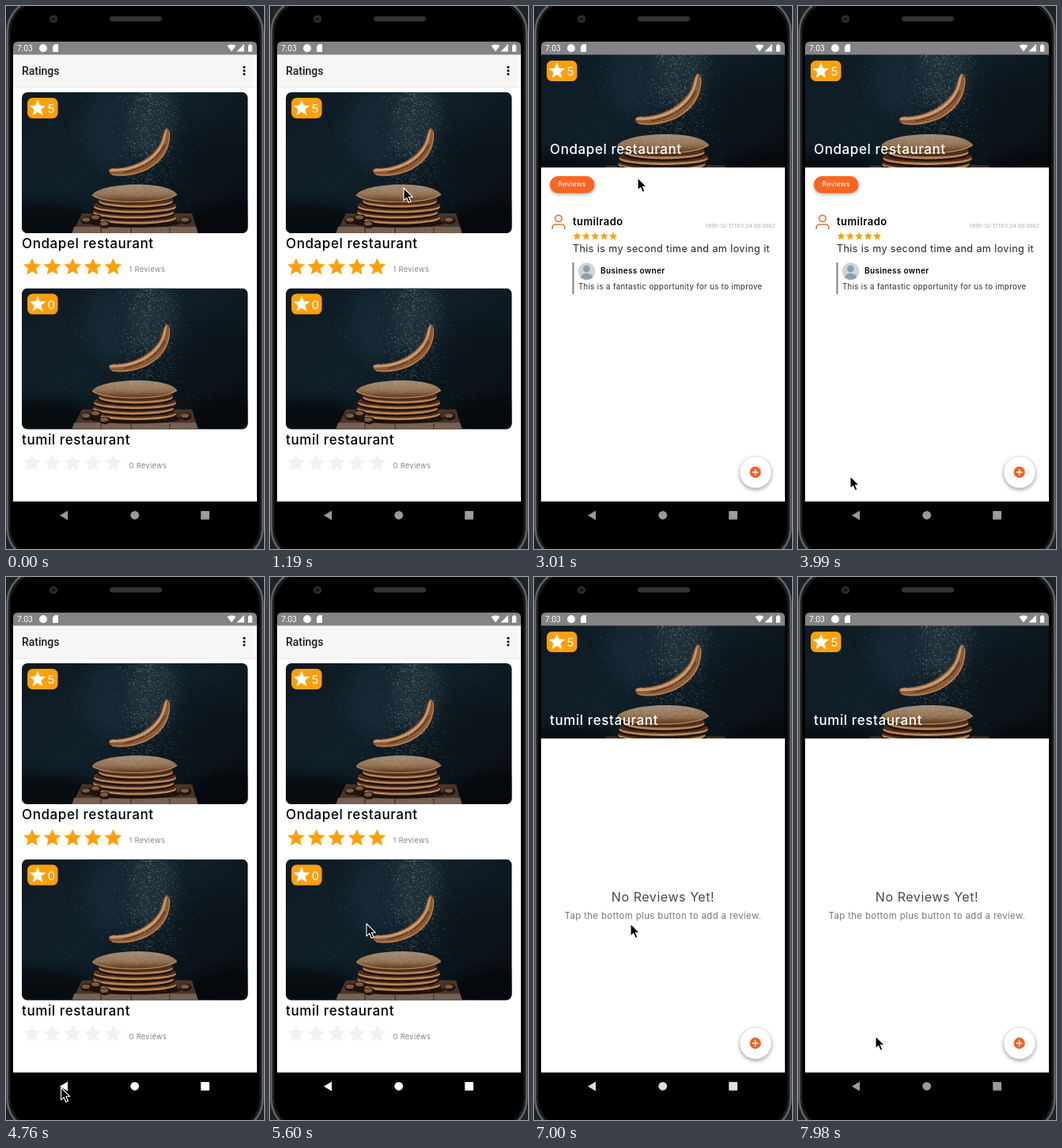
Animation, 326 px wide and 686 px high, one loop 8000 ms. Source, as an HTML page:

```html
<!DOCTYPE html>
<html lang="en">
<head>
<meta charset="utf-8">
<title>Ratings app</title>
<style>
html, body { margin: 0; width: 100%; height: 100%; overflow: hidden; background: #000; }
svg { display: block; }
text { font-family: Inter, "Open Sans", sans-serif; letter-spacing: .035em; white-space: pre; }
.ui { font-family: Roboto, sans-serif; letter-spacing: 0; }
.pill { filter: drop-shadow(0 2px 2px rgba(0,0,0,.28)); }
.fab { filter: drop-shadow(0 2.5px 2.5px rgba(0,0,0,.38)); }
.soft { filter: blur(9px); }
</style>
</head>
<body>
<svg id="stage" width="326" height="686" viewBox="0 0 326 686" xmlns="http://www.w3.org/2000/svg"></svg>
<script>
const ORANGE = '#ffa008', CORAL = '#fb6521';
const LOOP = 8000, TICK = 70;

let seed = 11;
const rnd = () => (seed = (seed * 16807) % 2147483647) / 2147483647;

const text = (x, y, size, str, fill = '#000', extra = '') =>
  `<text x="${x}" y="${y}" font-size="${size}" fill="${fill}" ${extra}>${str}</text>`;

function star(cx, cy, r, fill, ratio = 0.47) {
  let d = '';
  for (let i = 0; i < 10; i++) {
    const a = (i / 5 - 0.5) * Math.PI, q = i % 2 ? r * ratio : r;
    d += (i ? 'L' : 'M') + (cx + q * Math.cos(a)).toFixed(2) + ' ' + (cy + q * Math.sin(a)).toFixed(2);
  }
  return `<path d="${d}Z" fill="${fill}" stroke="${fill}" stroke-width="${r * 0.06}" stroke-linejoin="round"/>`;
}

const stars = (x, y, step, r, fill) =>
  [0, 1, 2, 3, 4].map(i => star(x + i * step, y, r, fill)).join('');

const ellipse = (x, y, rx, ry, fill, extra = '') =>
  `<ellipse cx="${x}" cy="${y}" rx="${rx}" ry="${ry}" fill="${fill}" ${extra}/>`;

// Specks of sugar, densest around (cx, cy)
function dust(count, cx, cy, w, h, color, opacity) {
  let d = '';
  for (let i = 0; i < count; i++) {
    const x = cx + (rnd() + rnd() - 1) * w, y = cy + (rnd() * 2 - 1) * h;
    d += `M${x.toFixed(1)} ${y.toFixed(1)}h.8`;
  }
  return `<path d="${d}" stroke="${color}" stroke-width=".8" opacity="${opacity}"/>`;
}

function photo() {
  const layers = [[159, 51, 144], [152, 51, 141], [145, 52, 143], [138, 47, 144]].map(([y, rx, x]) =>
    ellipse(x, y + 2, rx + 1, 8, '#1c100a') + ellipse(x, y, rx, 7.6, '#b58455') +
    ellipse(x, y - 2.2, rx, 7, '#4f2d18')).join('');
  const nuts = [[82, 162], [105, 167], [207, 162], [94, 159]].map(([x, y]) =>
    ellipse(x, y, 7.5, 4.8, '#20140d') + ellipse(x - 1, y - 1.2, 5, 2.6, '#7d593d')).join('');
  return `<g id="photo">
    <rect width="286" height="179" fill="url(#night)"/>
    <g class="soft">
      ${ellipse(115, 45, 40, 50, '#1a303c', 'opacity=".5"')}
      ${ellipse(165, 30, 28, 55, '#2a3c45', 'opacity=".55"')}
      ${ellipse(240, 95, 34, 42, '#0c151b', 'opacity=".7"')}
      ${ellipse(20, 165, 75, 26, '#05080b', 'opacity=".8"')}
      ${ellipse(262, 165, 50, 26, '#05070a', 'opacity=".8"')}
    </g>
    ${dust(520, 160, 55, 42, 60, '#b4c1c6', 0.5)}
    ${dust(330, 145, 88, 120, 85, '#9fb0b8', 0.4)}
    <path d="M76 153H215L223 179H63Z" fill="#45352b"/>
    <path d="M66 170H220L223 179H63Z" fill="#756052"/>
    <path d="M100 171V179M138 171V179M187 171V179" stroke="#30241d"/>
    ${ellipse(143, 165, 58, 6, '#1b110b')}
    ${layers}${nuts}
    <path d="M89 130C91 123 116 116.5 145 116.5S192 122 196 129C189 136 168 138 142 138.5S95 137 89 130Z" fill="url(#cake)"/>
    <path d="M89 130C100 137 121 138.5 142 138.5S186 136 196 129" fill="none" stroke="#b88a5f" stroke-width="1.2"/>
    ${dust(170, 143, 126, 50, 7, '#d8cbbb', 0.45)}
    <path d="M183 45C189 47 188 60 184 72C177 88 160 101 137 105C126 107 113 106 111 102C108 97 113 95 120 96C145 94 164 82 174 66C178 58 178 49 183 45Z" fill="#8c5a34"/>
    <path d="M183 46C179 51 180 58 175 67C165 84 145 95.5 120 97C115 96 110 97 111 100C130 101 154 95 167 82C179 70 183 57 183 46Z" fill="#c69c72"/>
    <path d="M186.5 50C188 70 176 87 160 96C146 103.500 127 106 114 104" fill="none" stroke="#c08a55" stroke-width="1.1"/>
    <path d="M181 66C172 85 152 96 129 101.500" fill="none" stroke="#6a4023" stroke-width="2"/>
    ${dust(170, 158, 60, 40, 60, '#e3e6e4', 0.6)}
    ${dust(110, 145, 160, 75, 17, '#cfc6bc', 0.4)}
  </g>`;
}

const badge = (x, y, digit, w = 38.5) =>
  `<rect x="${x}" y="${y}" width="${w}" height="26" rx="6.5" fill="${ORANGE}"/>` +
  star(x + 13, y + 13.3, 10.2, '#fff', 0.42) +
  text(x + 25.5, y + 19, 15, digit, '#fff');

const card = (y, name, digit, fill) => `
  <g transform="translate(20 ${y})">
    <g clip-path="url(#cardClip)"><use href="#photo"/></g>
    ${badge(7, 7, digit)}
    ${text(0, 197, 17, name, '#000', 'font-weight="500"')}
    ${stars(13, 221, 25.6, 10.8, fill)}
    ${text(135.5, 227, 9.3, digit === 5 ? '1 Reviews' : '0 Reviews', '#858585')}
  </g>`;

const list = `
  <g id="list">
    <rect x="9" y="61" width="308" height="41" fill="#f6f6f6"/>
    <rect x="9" y="102" width="308" height="1.5" fill="#eeeeee"/>
    ${text(20, 87, 14, 'Ratings', '#1c1c1c', 'class="ui" font-weight="500"')}
    ${[77.3, 81.7, 86.1].map(y => `<circle cx="301" cy="${y}" r="1.5"/>`).join('')}
    ${card(109, 'Ondapel restaurant', 5, ORANGE)}
    ${card(356.6, 'tumil restaurant', 0, '#f1f1f1')}
  </g>`;

const review = `
  <g id="review">
    <g fill="none" stroke="#dd7843" stroke-width="1.7" stroke-linecap="round">
      <circle cx="31" cy="268.5" r="4.1"/>
      <path d="M23.2 281.5V280A4 4 0 0 1 27.2 276H34.8A4 4 0 0 1 38.8 280V281.5"/>
    </g>
    ${text(49, 276.5, 13, 'tumilrado', '#000', 'font-weight="600"')}
    ${text(305.5, 280, 6.6, '1995-12-17T03:24:00.000Z', '#8c8c8c', 'text-anchor="end" font-weight="300"')}
    ${stars(54.5, 291, 11.4, 5, ORANGE)}
    ${text(49, 311, 12.5, 'This is my second time and am loving it', '#222')}
    <rect x="48.5" y="324" width="2" height="40" fill="#808080"/>
    <g clip-path="url(#avatarClip)">
      <rect x="55" y="324" width="23" height="23" fill="#ccd6db"/>
      <circle cx="66.5" cy="332" r="4.4" fill="#8aa0ad"/>
      ${ellipse(66.5, 344, 8, 6.5, '#8aa0ad')}
    </g>
    ${text(84, 337.5, 10, 'Business owner', '#000', 'font-weight="600"')}
    ${text(56, 358, 9.7, 'This is a fantastic opportunity for us to improve', '#2a2a2a')}
  </g>`;

const detail = `
  <g id="detail">
    <g id="cover" clip-path="url(#coverClip)">
      <use href="#photo" transform="translate(9 36) scale(1.081)"/>
    </g>
    <g id="emptyBadge">${badge(16, 69, '', 29.5)}</g>
    <g id="fullBadge">${badge(16, 69, 5)}</g>
    ${text(20, 187, 17, '', '#fff', 'id="heading" font-weight="500"')}
    <g id="pill">
      <rect class="pill" x="20" y="215" width="56.5" height="21.5" rx="10.7" fill="${CORAL}"/>
      ${text(48.2, 228.3, 8.5, 'Reviews', '#fff', 'text-anchor="middle"')}
    </g>
    <path id="loader" transform="translate(145.1 326.1) scale(1.47)" fill="#338a7d" d="M17.65 6.35C16.2 4.9 14.2 4 12 4a8 8 0 1 0 7.73 10h-2.08A6 6 0 1 1 12 6c1.66 0 3.14.69 4.22 1.78L13 11h7V4z"/>
    ${review}
    <g id="none" text-anchor="middle">
      ${text(163, 410, 16, 'No Reviews Yet!', '#434850')}
      ${text(163, 432, 11.35, 'Tap the bottom plus button to add a review.', '#777')}
    </g>
    <circle class="fab" cx="280" cy="589" r="20" fill="#fff" stroke="#c9c9c9" stroke-width=".4"/>
    <circle cx="279.7" cy="589" r="7.2" fill="#f2632a"/>
    <path d="M276 589h7.4M279.7 585.3v7.4" stroke="#fff" stroke-width="1.5"/>
  </g>`;

const phone = `
  <rect width="326" height="686" fill="#1d2329"/>
  <rect x="1.7" y="-9" width="322.6" height="710" rx="42" fill="#000" stroke="#5c5e61" stroke-width="3"/>
  <rect x="4.6" y="-5.500" width="316.8" height="703" rx="39" fill="none" stroke="#242629" stroke-width="1.4"/>
  <circle cx="60" cy="16.5" r="5" fill="#2b2e32"/><circle cx="60" cy="16.5" r="2.4" fill="#15171c"/>
  <rect x="131" y="13" width="66" height="6.5" rx="3.2" fill="#303337"/>
  <rect x="9" y="55" width="308" height="571" fill="#fff"/>`;

const bars = `
  <path d="M9 61.500V51Q9 45 15 45H311Q317 45 317 51V61.500Z" fill="#858385"/>
  ${text(14, 57, 10.3, '7:03', '#fff', 'class="ui"')}
  <g fill="#fff">
    <circle cx="47" cy="53.2" r="5"/>
    <path d="M61.5 48.3H66V58H59V51Z"/>
    <path d="M279.5 50.3Q285 46.5 290.5 50.3L285 57.6Z"/>
    <path d="M301 48V57.6H291.5Z"/>
    <path d="M306 49.4H307.4V48.2H309.8V49.4H311.2V57.8H306Z"/>
  </g>
  <g id="nav">
    <path d="M68 643.5L78 637.6V649.4Z"/>
    <circle cx="162.7" cy="643.3" r="5.4"/>
    <rect x="246.2" y="638" width="10.8" height="10.8" rx=".8"/>
  </g>`;

document.getElementById('stage').innerHTML = `
  <defs>
    <linearGradient id="night" x2="1" y2=".75">
      <stop offset="0" stop-color="#0e1a22"/><stop offset=".45" stop-color="#10202a"/><stop offset="1" stop-color="#090f14"/>
    </linearGradient>
    <linearGradient id="cake" x2="0" y2="1">
      <stop offset="0" stop-color="#a08d78"/><stop offset=".55" stop-color="#957353"/><stop offset="1" stop-color="#5b3820"/>
    </linearGradient>
    <clipPath id="cardClip"><rect width="285.5" height="178" rx="7"/></clipPath>
    <clipPath id="coverClip"><rect x="9" y="61" width="308" height="143"/></clipPath>
    <clipPath id="avatarClip"><circle cx="66.5" cy="335" r="10.8"/></clipPath>
    ${photo()}
  </defs>
  ${phone}${list}${detail}${bars}
  <path id="cursor" d="M0 0V15.6L3.6 12.3L6.2 18.2L8.9 17L6.4 11.3H11.3Z" stroke="#fff" stroke-width="1.1" stroke-linejoin="round"/>`;

const $ = id => document.getElementById(id);
const show = (id, on) => $(id).setAttribute('display', on ? 'inline' : 'none');
const clamp = v => Math.max(0, Math.min(1, v));

// time, x, y of the pointer tip
const PATH = [
  [0, 182, 700], [700, 169, 230], [1330, 169, 230], [1680, 131, 217],
  [3360, 131, 217], [3990, 66, 594], [4200, 68, 640], [4340, 69.5, 645],
  [4760, 69.5, 645], [5320, 130, 448], [5600, 122, 438], [7490, 122, 438], [7980, 98, 580]
];

function pointer(t) {
  let i = 0;
  while (i < PATH.length - 2 && t >= PATH[i + 1][0]) i++;
  const [a, x0, y0] = PATH[i], [b, x1, y1] = PATH[i + 1];
  const k = clamp((t - a) / (b - a)), e = k * k * (3 - 2 * k);
  return [x0 + (x1 - x0) * e, y0 + (y1 - y0) * e];
}

function render(t) {
  const second = t >= 6230;
  const onDetail = second || (t >= 2100 && t < 4550);
  show('list', !onDetail);
  show('detail', onDetail);

  if (onDetail) {
    const ready = second ? 6440 : 2310;
    const loaded = t >= ready;
    const fade = clamp((t - ready + TICK) / (second ? 2 * TICK : 4 * TICK));
    $('cover').setAttribute('opacity', loaded ? fade : 0);
    $('heading').textContent = loaded ? (second ? 'tumil restaurant' : 'Ondapel restaurant') : '';
    show('emptyBadge', !loaded);
    show('fullBadge', loaded);
    show('pill', !(second && loaded));
    show('loader', !loaded && t >= 2170);
    show('review', loaded && !second);
    show('none', loaded && second);
  }

  // Buttons light up on touch, then dim again
  const lit = t < 4340 ? 0 : 1 - clamp((t - 7000 + TICK) / (3 * TICK));
  const c = Math.round(155 + 100 * lit);
  $('nav').setAttribute('fill', `rgb(${c},${c},${c})`);

  const [x, y] = pointer(t);
  $('cursor').setAttribute('transform', `translate(${x.toFixed(1)} ${y.toFixed(1)})`);
}

const start = performance.now();
function loop() {
  const t = (performance.now() - start) % LOOP;
  render(Math.floor(t / TICK) * TICK);
  requestAnimationFrame(loop);
}
loop();
</script>
</body>
</html>
```
